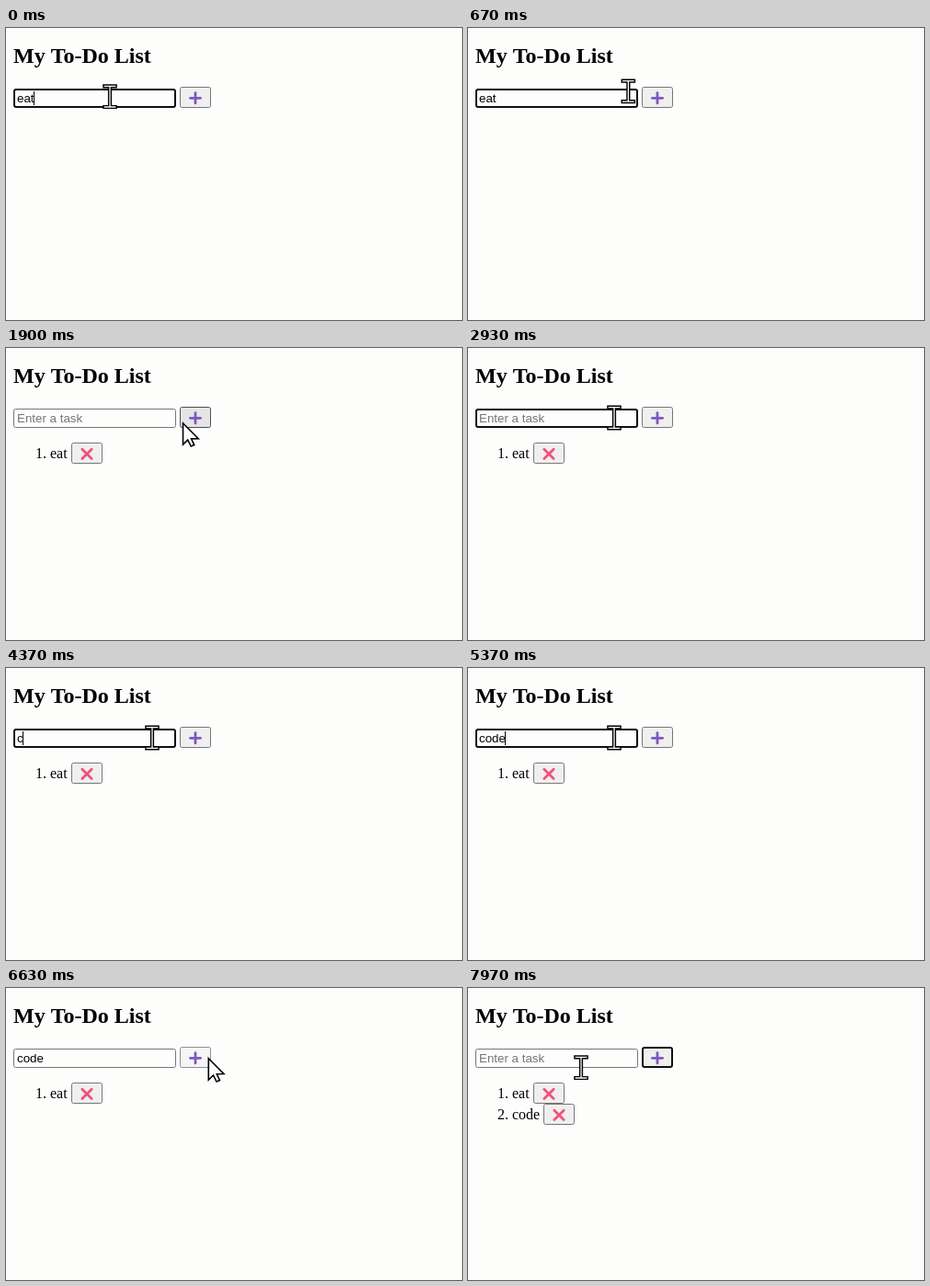
These frames come from a looping animation (496x318 px, 8000 ms). An HTML page with a canvas:

```html
<!DOCTYPE html>
<html lang="en">
<head>
<meta charset="utf-8">
<title>To-do list</title>
<style>
  html, body { margin: 0; width: 100%; height: 100%; overflow: hidden; background: #fdfdfc; }
  canvas { display: block; }
</style>
</head>
<body>
<canvas id="stage" width="496" height="318"></canvas>
<script>
const ctx = document.getElementById('stage').getContext('2d');
const LOOP = 8000;
const PAPER = '#fdfdfc', INK = '#000';
const SERIF = '"Liberation Serif", "Times New Roman", serif';
const SANS = '"Liberation Sans", Arial, sans-serif';

const FIELD = { x: 8, y: 66, w: 177, h: 21 };
const ADD = { x: 189, y: 64, w: 34, h: 23 };
const LOOKS = {
  field: { fill: PAPER, edge: '#767676' },
  normal: { fill: '#efefef', edge: '#767676' },
  hover: { fill: '#e5e5e5', edge: '#4f4f4f' },
  pressed: { fill: '#f5f5f5', edge: '#8d8d8d' }
};

const CLICK_ADD = [1050, 6720], PRESS = 120;
const FOCUS = 2400, TYPE = 4240, KEY_GAP = 240, WORD = 'code';

// Each move bends sideways by (bx, by) at its middle
const START = { x: 113, y: 74.7 };
const MOVES = [
  { from: 300, to: 900, x: 204, y: 66, bx: 0, by: 0 },
  { from: 1700, to: 2300, x: 159, y: 76, bx: 0, by: 17 },
  { from: 5450, to: 5930, x: 239, y: 82, bx: 0, by: 0 },
  { from: 5930, to: 6580, x: 220, y: 76, bx: 25, by: 44 },
  { from: 6950, to: 7700, x: 123, y: 86.7, bx: 0, by: 35 }
];

const clamp = u => Math.min(1, Math.max(0, u));
const smooth = u => u * u * (3 - 2 * u);
const inside = (p, r) => p.x >= r.x && p.x < r.x + r.w && p.y >= r.y && p.y < r.y + r.h;

function pointerAt(t) {
  let { x, y } = START;
  for (const m of MOVES) {
    const u = smooth(clamp((t - m.from) / (m.to - m.from)));
    const bend = Math.sin(Math.PI * u);
    x += (m.x - x) * u + m.bx * bend;
    y += (m.y - y) * u + m.by * bend;
  }
  return { x, y };
}

function fieldAt(t) {
  const [first, second] = CLICK_ADD;
  const typed = Math.min(WORD.length, Math.max(0, Math.floor((t - TYPE) / KEY_GAP) + 1));
  const text = t < first ? 'eat' : t < second ? WORD.slice(0, typed) : '';
  const focused = t < first - PRESS || (t >= FOCUS && t < second - PRESS);
  const lastInput = typed ? TYPE + (typed - 1) * KEY_GAP : t < FOCUS ? 0 : FOCUS;
  return { text, focused, caret: focused && (t - lastInput) % 1000 < 500 };
}

function addLook(t, p) {
  if (CLICK_ADD.some(c => t >= c - PRESS && t < c)) return LOOKS.pressed;
  return inside(p, ADD) ? LOOKS.hover : LOOKS.normal;
}

function label(str, x, y, font, color = INK, align = 'left') {
  ctx.font = font;
  ctx.fillStyle = color;
  ctx.textAlign = align;
  ctx.fillText(str, x, y);
}

function box(r, look, focused) {
  const line = focused ? 2 : 1;
  ctx.beginPath();
  ctx.roundRect(r.x + line / 2, r.y + line / 2, r.w - line, r.h - line, 2);
  ctx.fillStyle = look.fill;
  ctx.fill();
  ctx.lineWidth = line;
  ctx.strokeStyle = focused ? '#101010' : look.edge;
  ctx.stroke();
}

function cross(x, y, arm, angle, color) {
  ctx.save();
  ctx.translate(x, y);
  ctx.rotate(angle);
  ctx.beginPath();
  ctx.moveTo(-arm, 0);
  ctx.lineTo(arm, 0);
  ctx.moveTo(0, -arm);
  ctx.lineTo(0, arm);
  ctx.lineCap = 'round';
  ctx.lineWidth = 2.8;
  ctx.strokeStyle = color;
  ctx.stroke();
  ctx.restore();
}

function drawField({ text, focused, caret }) {
  box(FIELD, LOOKS.field, focused);
  label(text || 'Enter a task', 12, 81, '13.333px ' + SANS, text ? INK : '#757575');
  if (caret) {
    const width = text ? ctx.measureText(text).width : 0;
    ctx.fillStyle = INK;
    ctx.fillRect(Math.floor(12 + width), 69, 1, 15);
  }
}

function drawItem(n, task) {
  const top = 103 + (n - 1) * 23, font = '16px ' + SERIF;
  label(n + '.', 44, top + 17, font, INK, 'right');
  label(task, 48, top + 17, font);
  const x = Math.round(52 + ctx.measureText(task).width);
  box({ x, y: top, w: 34, h: 23 }, LOOKS.normal, false);
  cross(x + 17, top + 12.3, 7.3, Math.PI / 4, '#f2527a');
}

function drawArrow() {
  const pts = [[0.3, 0.8], [0.3, 24], [5.5, 19], [9, 26], [12.5, 24.5], [9.3, 17.8], [17, 17.6]];
  ctx.beginPath();
  pts.forEach(([x, y]) => ctx.lineTo(x, y));
  ctx.closePath();
  ctx.fillStyle = '#fff';
  ctx.fill();
  ctx.lineJoin = 'miter';
  ctx.lineWidth = 1.6;
  ctx.strokeStyle = INK;
  ctx.stroke();
}

function drawBeam() {
  ctx.beginPath();
  for (const y of [-11.3, 11.3]) {
    ctx.moveTo(-5.7, y);
    ctx.lineTo(5.7, y);
  }
  ctx.moveTo(0, -11.3);
  ctx.lineTo(0, 11.3);
  ctx.lineCap = 'square';
  for (const [width, color] of [[4.2, INK], [1.3, '#fff']]) {
    ctx.lineWidth = width;
    ctx.strokeStyle = color;
    ctx.stroke();
  }
}

function drawPointer(p) {
  ctx.save();
  ctx.translate(p.x, p.y);
  if (inside(p, FIELD)) drawBeam();
  else drawArrow();
  ctx.restore();
}

function draw(t) {
  const p = pointerAt(t);
  ctx.fillStyle = PAPER;
  ctx.fillRect(0, 0, 496, 318);
  label('My To-Do List', 8, 38, 'bold 24px ' + SERIF);
  drawField(fieldAt(t));
  box(ADD, addLook(t, p), t >= CLICK_ADD[1]);
  cross(206, 76.3, 5.6, 0, '#7a5bbd');
  ['eat', WORD].forEach((task, i) => {
    if (t >= CLICK_ADD[i]) drawItem(i + 1, task);
  });
  drawPointer(p);
}

function tick() {
  draw(performance.now() % LOOP);
  requestAnimationFrame(tick);
}
tick();
</script>
</body>
</html>
```
